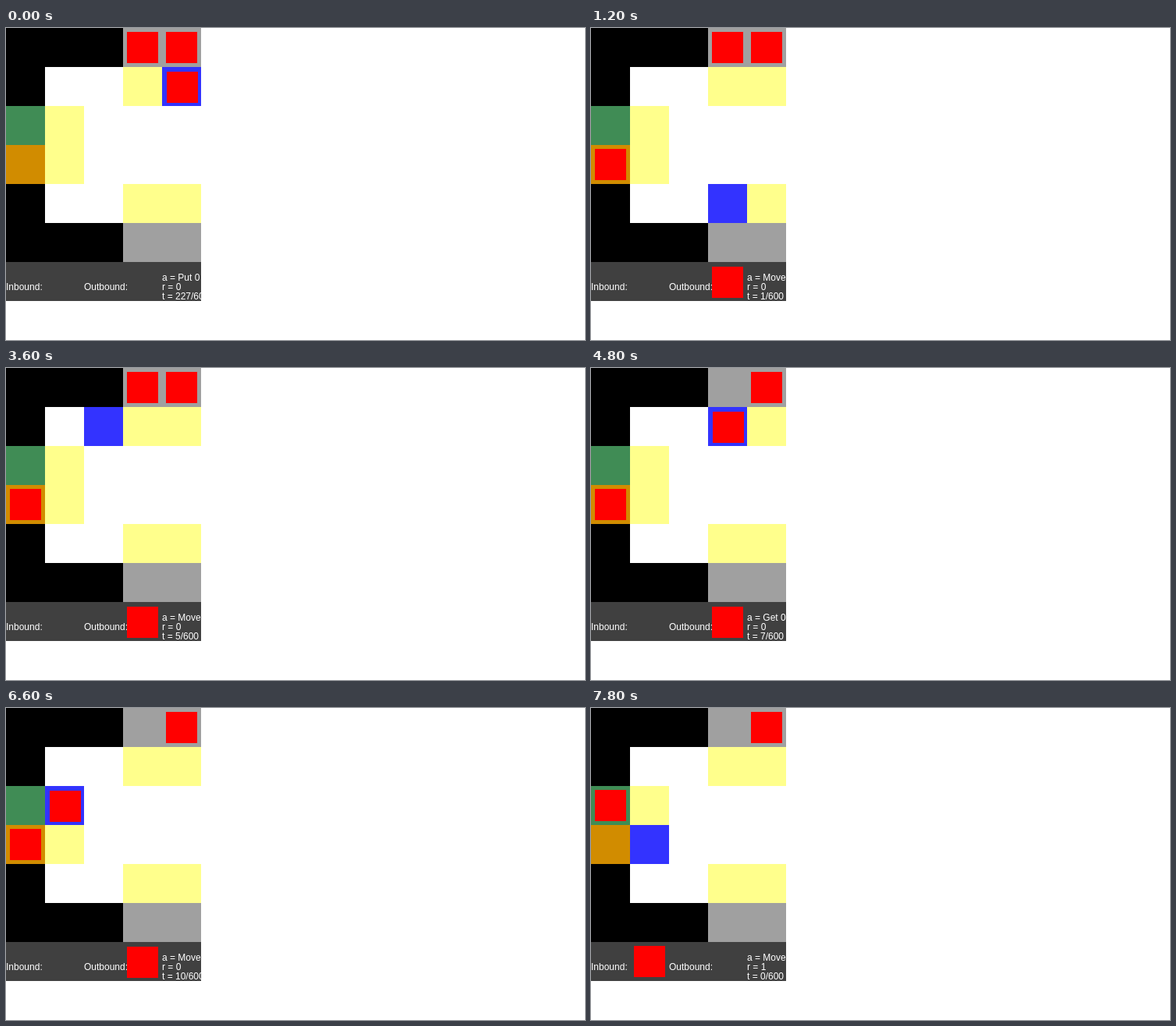
An HTML page with a canvas for the animation above (8 s loop, 742 by 400 pixels).

```html
<!DOCTYPE html>
<html lang="en">
<head>
<meta charset="utf-8">
<title>Warehouse grid</title>
<style>
  html, body { margin: 0; width: 100%; height: 100%; overflow: hidden; background: #fff; }
  canvas { display: block; }
</style>
</head>
<body>
<canvas id="stage" width="742" height="400"></canvas>
<script>
const ctx = document.getElementById('stage').getContext('2d');
const CELL = 50, STEP = 600, LOOP = 8000;
const RED = '#ff0000', YELLOW = '#ffff8c';

// Agent cell per step; consecutive steps are one grid move or a stay.
const route = [[4, 1], [4, 4], [3, 4], [3, 3], [2, 3], [2, 2], [2, 1],
               [3, 1], [3, 1], [3, 2], [2, 2], [1, 2], [1, 3], [1, 3]];
const PICK = 8, LAST = route.length - 1;
const actions = { 0: 'Put 0', 1: 'None', [PICK]: 'Get 0' };

function cells(color, col, row, w = 1, h = 1) {
  ctx.fillStyle = color;
  ctx.fillRect(col * CELL, row * CELL, w * CELL, h * CELL);
}

function item(col, row, dx = 5, dy = 5) {
  ctx.fillStyle = RED;
  ctx.fillRect(col * CELL + dx, row * CELL + dy, 40, 40);
}

function drawMap() {
  cells('#000', 0, 0, 5, 6);
  cells('#fff', 1, 1, 4, 4);
  cells('#a0a0a0', 3, 0, 2);
  cells('#a0a0a0', 3, 5, 2);
  cells(YELLOW, 3, 1, 2);
  cells(YELLOW, 3, 4, 2);
  cells(YELLOW, 1, 2, 1, 2);
  cells('#408c55', 0, 2);
  cells('#d18c00', 0, 3);
  cells('#404040', 0, 6, 5);
}

function drawItems(step) {
  item(4, 0);
  if (step < PICK) item(3, 0);
  if (step === LAST) {
    item(0, 2);
    item(1, 6);
  } else if (step > 0) {
    item(0, 3);
    item(3, 6, 5, 6);
  }
}

function drawAgent(step) {
  const [col, row] = route[step];
  cells('#3333ff', col, row);
  if (step === 0 || (step >= PICK && step < LAST)) item(col, row, 6, 6);
}

function drawStatus(step) {
  const count = step === 0 ? 227 : (step - 1) % (LAST - 1);
  ctx.fillStyle = '#fff';
  ctx.font = '12px "Liberation Sans", Arial, sans-serif';
  ctx.fillText('Inbound:', 0, 336);
  ctx.fillText('Outbound:', 100, 336);
  ctx.fillText('a = ' + (actions[step] || 'Move'), 200, 324);
  ctx.fillText('r = ' + (step === LAST ? 1 : 0), 200, 336);
  ctx.fillText(`t = ${count}/600`, 200, 348);
}

function draw(step) {
  ctx.clearRect(0, 0, 742, 400);
  ctx.save();
  ctx.beginPath();
  ctx.rect(0, 0, 250, 350);
  ctx.clip();
  drawMap();
  drawItems(step);
  drawAgent(step);
  drawStatus(step);
  ctx.restore();
}

const start = performance.now();
function tick() {
  const time = (performance.now() - start) % LOOP;
  draw(Math.min(LAST, Math.floor(time / STEP)));
  requestAnimationFrame(tick);
}
tick();
</script>
</body>
</html>
```
